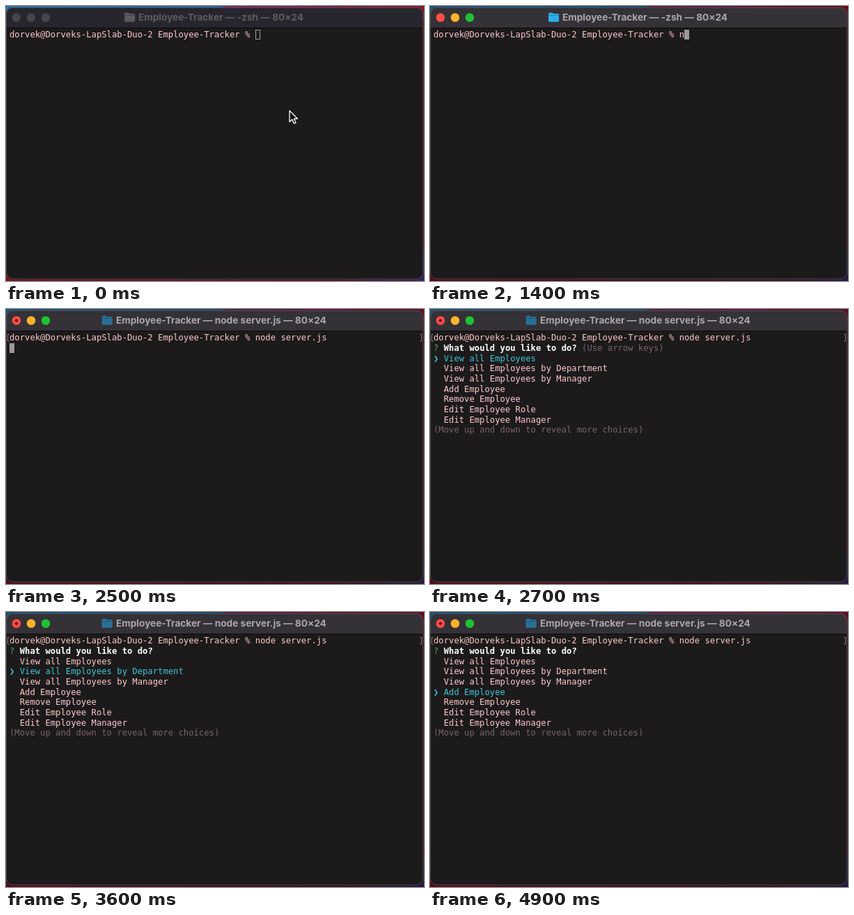
These frames come from a looping animation (600 px wide and 394 px high, 5 s). An HTML page:

```html
<!DOCTYPE html>
<html lang="en">
<head>
<meta charset="utf-8">
<title>Employee-Tracker terminal</title>
<style>
  html, body { margin: 0; width: 100%; height: 100%; overflow: hidden; }
  body { background: #1c1a1b; }

  .stage { position: relative; width: 600px; height: 394px; overflow: hidden; }
  .stage > svg { position: absolute; inset: 0; }

  /* Every state change is a hard cut on one shared 5 s clock. */
  .stage, .shade, .unfocused, .shell, .running, .menu, .hint, .arrow, .ibeam, .hollow, .cursor {
    animation: 5s step-end infinite;
  }
  .stage { animation-name: type, pick; --typed: 0; --pick: 0; }
  .shade { animation-name: shade; }
  .unfocused { animation-name: unfocused; }
  .shell { animation-name: shell; }
  .running { animation-name: running; }
  .menu { animation-name: menu; }
  .hint { animation-name: hint; }
  .arrow { animation-name: arrow; }
  .ibeam { animation-name: ibeam; }
  .hollow { animation-name: hollow; }
  .cursor { animation-name: cursor; }

  @keyframes type {
    0% { --typed: 0; }
    28% { --typed: 1; }
    30% { --typed: 2; }
    32% { --typed: 3; }
    36% { --typed: 4; }
    38% { --typed: 5; }
    40% { --typed: 6; }
    44% { --typed: 7; }
    46%, 100% { --typed: 14; }
  }
  @keyframes pick {
    0% { --pick: 0; }
    64% { --pick: 1; }
    76% { --pick: 2; }
    82%, 100% { --pick: 3; }
  }
  @keyframes shade { 0% { opacity: .15; } 6%, 100% { opacity: .38; } }
  @keyframes unfocused { 0% { opacity: 1; } 6%, 100% { opacity: 0; } }
  @keyframes shell { 0% { opacity: 0; } 6% { opacity: 1; } 50%, 100% { opacity: 0; } }
  @keyframes running { 0% { opacity: 0; } 50%, 100% { opacity: 1; } }
  @keyframes menu { 0% { opacity: 0; } 52%, 100% { opacity: 1; } }
  @keyframes hint { 0% { opacity: 1; } 64%, 100% { opacity: 0; } }
  @keyframes arrow {
    0% { opacity: 1; transform: translate(407px, 150px); }
    2% { opacity: 1; transform: translate(404px, 126px); }
    4% { opacity: 1; transform: translate(399px, 82px); }
    6%, 100% { opacity: 0; }
  }
  @keyframes ibeam { 0% { opacity: 0; } 6% { opacity: 1; } 28%, 100% { opacity: 0; } }
  @keyframes hollow { 0% { opacity: 1; } 10%, 100% { opacity: 0; } }
  @keyframes cursor {
    0% { opacity: 0; }
    10% { opacity: 1; left: calc((48 + var(--typed)) * 1ch); top: 0; }
    50% { opacity: 1; left: 0; top: var(--row); }
    52%, 100% { opacity: 0; }
  }

  .title { font: 700 13.65px Inter, sans-serif; }

  .screen {
    --row: 14.667px;
    position: absolute; left: 5px; top: 34.4px; width: 590px; height: 340px;
    font: 12.21px/14.667px "DejaVu Sans Mono", monospace;
    color: #ffcacb; white-space: pre;
  }
  .screen div, .typed, .hint { position: absolute; left: 0; top: 0; }
  .screen .typed { left: 48ch; width: calc(var(--typed) * 1ch); overflow: hidden; }
  .hollow, .cursor { box-sizing: border-box; width: 1ch; height: 14px; }
  .screen .hollow { left: 48ch; border: 1px solid #a19d9e; }
  .cursor { background: #9d999a; }

  .screen .menu { top: var(--row); }
  .menu b { color: #fff; }
  .menu i { font-style: normal; color: #43b945; }
  .dim { color: #79636a; }
  .screen .hint { left: 29ch; }
  .screen .choices { left: 2ch; top: var(--row); }
  .screen .picked {
    left: 0; top: calc((1 + var(--pick)) * var(--row));
    width: 45ch; height: var(--row);
    overflow: hidden; background: #1c1a1b; color: #3cc5d5;
  }
  .screen .picked div { left: 2ch; top: calc(var(--pick) * -1 * var(--row)); }
  .screen .picked .pointer { left: 0; top: 0; font-weight: 700; }
  .screen .more { top: calc(8 * var(--row)); }
</style>
</head>
<body>
<div class="stage">
  <svg width="600" height="394" viewBox="0 0 600 394">
    <defs>
      <linearGradient id="sky">
        <stop offset="0" stop-color="#2f86c0"/>
        <stop offset=".51" stop-color="#2a74b2"/>
        <stop offset=".53" stop-color="#8c2c72"/>
        <stop offset="1" stop-color="#9c1834"/>
      </linearGradient>
      <linearGradient id="ground">
        <stop offset="0" stop-color="#8a1426"/>
        <stop offset=".8" stop-color="#6b1430"/>
        <stop offset="1" stop-color="#3c2c70"/>
      </linearGradient>
      <clipPath id="frame"><rect y="2" width="599" height="389.5" rx="10"/></clipPath>
      <g id="folder">
        <path d="M0 2q0-2 2-2h3.2q.8 0 1.4.7l.7.8h6q1.9 0 1.9 1.9v8q0 1.8-1.9 1.8H1.9Q0 13.2 0 11.4z" fill="currentColor"/>
        <path d="M0 4h15.2" stroke="#000" stroke-opacity=".22"/>
      </g>
      <g id="lights">
        <circle cx="15" cy="16.5" r="6.3" fill="#fe4d48"/>
        <circle cx="36" cy="16.5" r="6.3" fill="#fdb32b"/>
        <circle cx="57" cy="16.5" r="6.3" fill="#20c132"/>
      </g>
      <path id="beam" d="M394.5 53.5q3 0 3.5 2 .5-2 3.5-2M398 55.5v11M394.5 68.5q3 0 3.5-2 .5 2 3.5 2M396 62.5h4"/>
    </defs>

    <rect width="600" height="40" fill="url(#sky)"/>
    <rect y="40" width="600" height="354" fill="url(#ground)"/>
    <rect x="560" y="20" width="40" height="330" fill="#751530"/>
    <rect class="shade" width="600" height="394"/>

    <g clip-path="url(#frame)">
      <rect width="600" height="394" fill="#1c1a1b"/>
      <rect width="600" height="31" fill="#343137"/>
      <g class="unfocused">
        <rect width="600" height="31" fill="#27252d"/>
        <g fill="#47454b">
          <circle cx="15" cy="16.5" r="6.3"/>
          <circle cx="36" cy="16.5" r="6.3"/>
          <circle cx="57" cy="16.5" r="6.3"/>
        </g>
        <use href="#folder" x="170" y="9.5" color="#5b595e"/>
        <text class="title" x="190" y="21" fill="#5e5b62">Employee-Tracker — -zsh — 80×24</text>
      </g>
      <g class="shell">
        <use href="#lights"/>
        <use href="#folder" x="170" y="9.5" color="#2caee8"/>
        <text class="title" x="190" y="21" fill="#aaa7ac">Employee-Tracker — -zsh — 80×24</text>
      </g>
      <g class="running">
        <use href="#lights"/>
        <circle cx="15" cy="16.5" r="2.3" fill="#6d1012"/>
        <use href="#folder" x="137.5" y="9.5" color="#286f97"/>
        <text class="title" x="158" y="21" fill="#aaa7ac">Employee-Tracker — node server.js — 80×24</text>
        <path d="M5 36.5H2.500v9.500H5M594 36.5h2.500v9.500H594" fill="none" stroke="#86747a"/>
      </g>
      <path d="M0 31.5h600" stroke="#0c0b0c"/>
    </g>
    <rect x=".5" y="2.5" width="598" height="388.5" rx="9.5" fill="none" stroke="#59565b" stroke-opacity=".8"/>
  </svg>

  <div class="screen">
    <div>dorvek@Dorveks-LapSlab-Duo-2 Employee-Tracker %</div>
    <div class="typed">node server.js</div>
    <div class="hollow"></div>
    <div class="cursor"></div>
    <div class="menu"><i>?</i> <b>What would you like to do?</b><span class="hint dim">(Use arrow keys)</span>
      <div class="choices">View all Employees
View all Employees by Department
View all Employees by Manager
Add Employee
Remove Employee
Edit Employee Role
Edit Employee Manager</div>
      <div class="picked"><div class="pointer">❯</div><div>View all Employees
View all Employees by Department
View all Employees by Manager
Add Employee</div></div>
      <div class="more dim">(Move up and down to reveal more choices)</div>
    </div>
  </div>

  <svg width="600" height="394" viewBox="0 0 600 394">
    <path class="arrow" d="M0 0v16l3.7-3.5 2.6 5.8 2.7-1.2-2.6-5.6h5.1z" fill="#111" stroke="#fff" stroke-width="1.3" stroke-linejoin="round"/>
    <g class="ibeam" fill="none" stroke-linecap="round">
      <use href="#beam" stroke="#fff" stroke-width="3.4"/>
      <use href="#beam" stroke="#111" stroke-width="1.2"/>
    </g>
  </svg>
</div>
</body>
</html>
```
